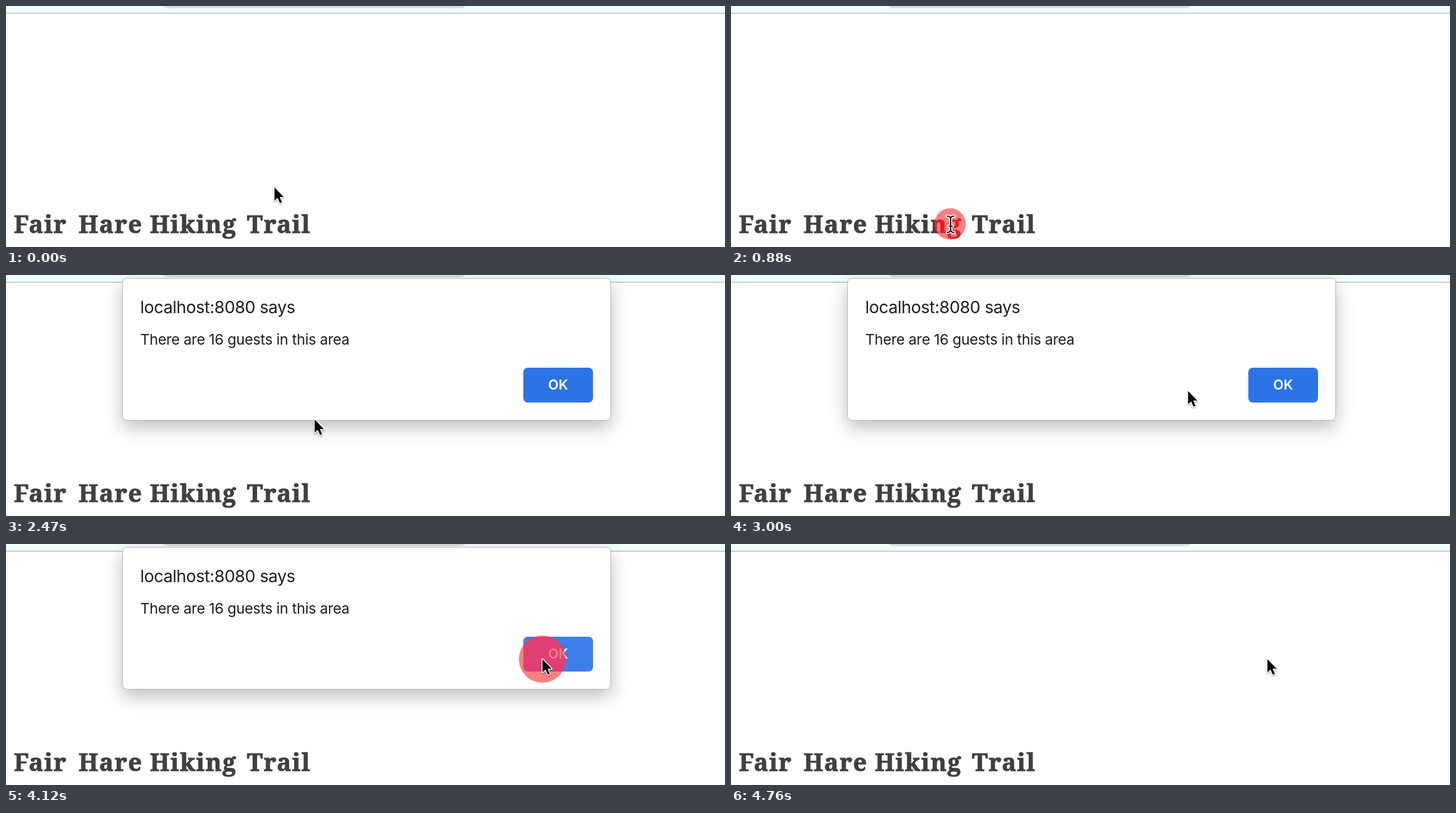
An HTML page that plays this animation: 1280x429 px, repeating every 7.24 s.

```html
<!DOCTYPE html>
<html lang="en">
<head>
<meta charset="utf-8">
<title>Guest count alert</title>
<style>
  html, body { margin: 0; width: 100%; height: 100%; overflow: hidden; background: #fff; }
  svg { display: block; width: 1280px; height: 429px; }
  .heading { font: 700 43px "Noto Serif", serif; letter-spacing: 1.6px; fill: #404041; stroke: #404041; }
  #dialog { font-family: Inter, sans-serif; fill: #1f1f21; }
  .panel { fill: #fff; stroke: #b5b5b5; filter: drop-shadow(0 12px 16px rgba(0, 0, 0, .26)); }
  .glow { mix-blend-mode: lighten; fill: #e50000; }
  .tint { mix-blend-mode: multiply; fill: #fa8080; }
  #arrow { filter: drop-shadow(0 2px 1.5px rgba(0, 0, 0, .3)); }
</style>
</head>
<body>
<svg viewBox="0 0 1280 429">
  <defs>
    <path id="beamShape" d="M-6-14Q0-14 0-9Q0-14 6-14M0-9V10M-6 15Q0 15 0 10Q0 15 6 15M-3 4H3"/>
  </defs>
  <rect width="1280" height="429" fill="#fff"/>
  <rect width="1280" height="12" fill="#f0ffff"/>
  <rect y="12" width="1280" height="1.6" fill="#b4c0c4"/>
  <rect x="273" y="-40" width="552" height="44" rx="18" fill="#d5dfe0"/>
  <text class="heading" y="404">
    <tspan x="14">Fair</tspan> <tspan x="129">Hare</tspan> <tspan x="256">Hiking</tspan> <tspan x="429">Trail</tspan>
  </text>

  <g id="dialog">
    <rect class="panel" x="207.5" y="6" width="869" height="252.5" rx="8"/>
    <text x="239" y="68" font-size="30" letter-spacing="-.5">localhost:8080 says</text>
    <text x="239" y="124" font-size="26" letter-spacing="-.34">There are 16 guests in this area</text>
    <rect x="921" y="165" width="124" height="62" rx="8" fill="#2d73e8"/>
    <rect id="hover" x="921" y="165" width="124" height="62" rx="8" fill="#fff"/>
    <text x="983" y="204" font-size="24" font-weight="600" text-anchor="middle" fill="#fff">OK</text>
  </g>

  <circle class="glow"/>
  <circle class="tint"/>

  <path id="arrow" d="M0 0V23.5L5.4 18.4L9.8 27.7L13.2 26.2L9.2 17H16.4Z"
        fill="#000" stroke="#fff" stroke-width="3" stroke-linejoin="round" paint-order="stroke"/>
  <g id="beam" fill="none" stroke-linecap="round">
    <use href="#beamShape" stroke="#fff" stroke-width="5.5"/>
    <use href="#beamShape" stroke="#000" stroke-width="2"/>
  </g>
</svg>
<script>
const LOOP = 7240;
const byId = id => document.getElementById(id);
const dialog = byId('dialog'), hover = byId('hover'), arrow = byId('arrow'), beam = byId('beam');
const circles = document.querySelectorAll('circle');

// Pointer moves: start, end, then a quadratic curve (from, control, to).
const moves = [
  [20, 410, 478, 323, 440, 352, 390, 386],
  [2080, 2820, 390, 386, 521, 226, 711, 218],
  [2840, 3590, 711, 218, 1188, 164, 933, 202],
  [3610, 3820, 933, 202, 944, 203, 955, 205]
];
const clicks = [[650, 390, 388], [4060, 955, 205]];

const progress = (t, start, end) => Math.min(1, Math.max(0, (t - start) / (end - start)));
const smooth = p => p * p * (3 - 2 * p);
const curve = (a, b, c, p) => (1 - p) ** 2 * a + 2 * p * (1 - p) * b + p * p * c;

function pointerAt(t) {
  const [start, end, x0, y0, cx, cy, x1, y1] = moves.filter(m => m[0] <= t).pop() || moves[0];
  const p = smooth(progress(t, start, end));
  return [curve(x0, cx, x1, p), curve(y0, cy, y1, p)];
}

function draw(t) {
  const [x, y] = pointerAt(t);
  const overText = t < 1060 && y > 364;
  arrow.setAttribute('transform', `translate(${x} ${y})`);
  beam.setAttribute('transform', `translate(${x + 1} ${y + 2})`);
  arrow.style.display = overText ? 'none' : '';
  beam.style.display = overText ? '' : 'none';

  const shown = smooth(progress(t, 1040, 1270)) * (1 - smooth(progress(t, 4370, 4600)));
  dialog.style.opacity = shown;
  dialog.setAttribute('transform', `translate(0 ${-14 * (1 - shown)})`);
  hover.style.opacity = .08 * progress(t, 3610, 3820);

  const [start, cx, cy] = clicks.filter(c => c[0] <= t).pop() || [t, 0, 0];
  const radius = t < clicks[0][0] ? 0 : 47 * (1 - progress(t, start, start + 570));
  for (const circle of circles) {
    circle.setAttribute('cx', cx);
    circle.setAttribute('cy', cy);
    circle.setAttribute('r', radius);
  }
}

const origin = performance.now();
function tick() {
  draw((performance.now() - origin) % LOOP);
  requestAnimationFrame(tick);
}
tick();
</script>
</body>
</html>
```
